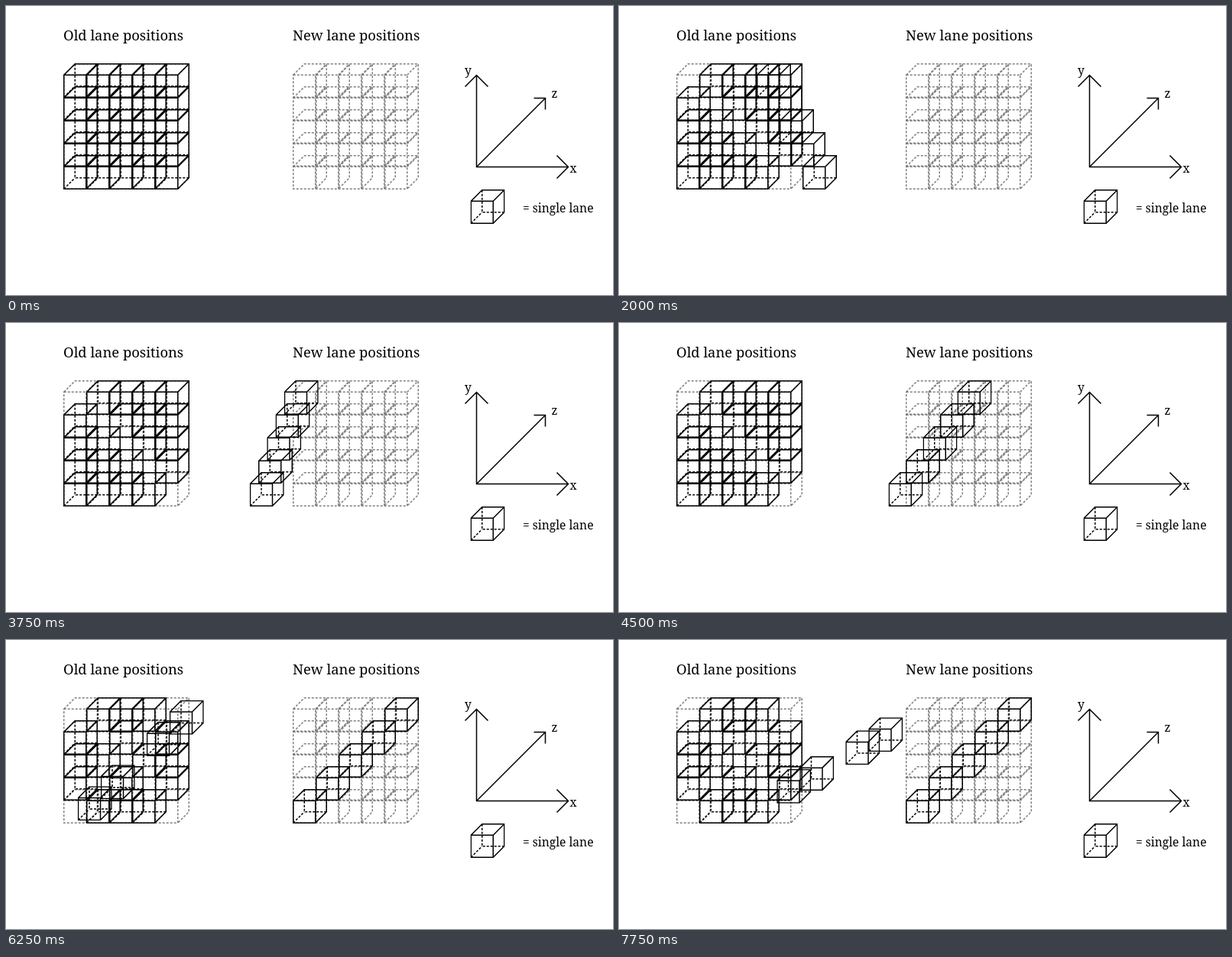
Recreate the animation shown at these times as an HTML page. Size 794x378 px, loop 8 s.

```html
<!DOCTYPE html>
<html lang="en">
<head>
<meta charset="utf-8">
<title>Lane positions</title>
<style>
  html, body { margin: 0; width: 100%; height: 100%; overflow: hidden; background: #fff; }
  svg { display: block; }
  text { font: 15.6px "Noto Serif", serif; }
  .title { font-size: 18.4px; }
  .line { fill: none; stroke: #000; stroke-width: 1.5; }
  .dash { stroke-dasharray: 3 2; }
  .ghost { stroke: #808080; }
</style>
</head>
<body>
<svg id="stage" width="794" height="378" viewBox="0 0 794 378">
  <!-- Strokes lie wholly inside the 45 px box, so neighbouring edges double up. -->
  <symbol id="cube" width="45" height="45" viewBox="0 0 45 45">
    <path class="line" d="M.75 15.25h29v29h-29zl14.5-14.5h29v29l-14.5 14.5M29.75 15.25l14.5-14.5"/>
    <path class="line dash" d="M15.25 .75v29h29M.75 44.25l14.5-14.5"/>
  </symbol>
  <symbol id="slot" width="45" height="45" viewBox="0 0 45 45">
    <path class="line dash ghost" d="M.75 15.25h29v29h-29zl14.5-14.5h29v29l-14.5 14.5M29.75 15.25l14.5-14.5"/>
  </symbol>

  <text class="title" x="75" y="45">Old lane positions</text>
  <text class="title" x="375" y="45">New lane positions</text>

  <path class="line" d="M615.5 90.5V210.5H735.5M615.5 210.5L705.5 120.5
    M600.5 105.5L615.5 90.5L630.5 105.5M720.5 195.5L735.5 210.5L720.5 225.5
    M690.5 120.5H705.5V135.5"/>
  <text x="600" y="90">y</text>
  <text x="713.5" y="120">z</text>
  <text x="737.5" y="218">x</text>
  <text x="676" y="270">= single lane</text>
</svg>
<script>
const SIZE = 5, CELL = 30, TOP = 75, OLD = 75, NEW = 375;
const LOOP = 8000, TICK = 250, STEPS = 16;
const stage = document.getElementById('stage');

function place(el, x, y) {
  el.setAttribute('x', x);
  el.setAttribute('y', y);
}

function add(shape, x, y) {
  const el = document.createElementNS('http://www.w3.org/2000/svg', 'use');
  el.setAttribute('href', '#' + shape);
  el.setAttribute('width', 45);
  el.setAttribute('height', 45);
  place(el, x, y);
  return stage.appendChild(el);
}

function eachCell(visit) {
  for (let row = 0; row < SIZE; row++)
    for (let col = 0; col < SIZE; col++) visit(row, col, col * CELL, TOP + row * CELL);
}

eachCell((row, col, x, y) => {
  add('slot', OLD + x, y);
  add('slot', NEW + x, y);
});

// The main diagonal mirrors within its rows; the other one gathers in the middle row.
const movers = [];
eachCell((row, col, x, y) => {
  const el = add('cube', OLD + x, y);
  const lane = { el, x: OLD + x, y, dx: NEW - OLD, dy: 0 };
  if (row === col) {
    movers.push({ ...lane, start: 1250, dx: lane.dx + (4 - 2 * row) * CELL });
  } else if (row + col === SIZE - 1) {
    movers.push({ ...lane, start: 6250, dy: (2 - row) * CELL });
  }
});
add('cube', 607.5, 240);

function progress(t, start) {
  const step = Math.floor((t - start) / TICK) + 1;
  return Math.max(0, Math.min(STEPS, step)) / STEPS;
}

function draw(now) {
  const t = now % LOOP;
  for (const m of movers) {
    const p = progress(t, m.start);
    place(m.el, m.x + m.dx * p, m.y + m.dy * p);
  }
  requestAnimationFrame(draw);
}
requestAnimationFrame(draw);
</script>
</body>
</html>
```
